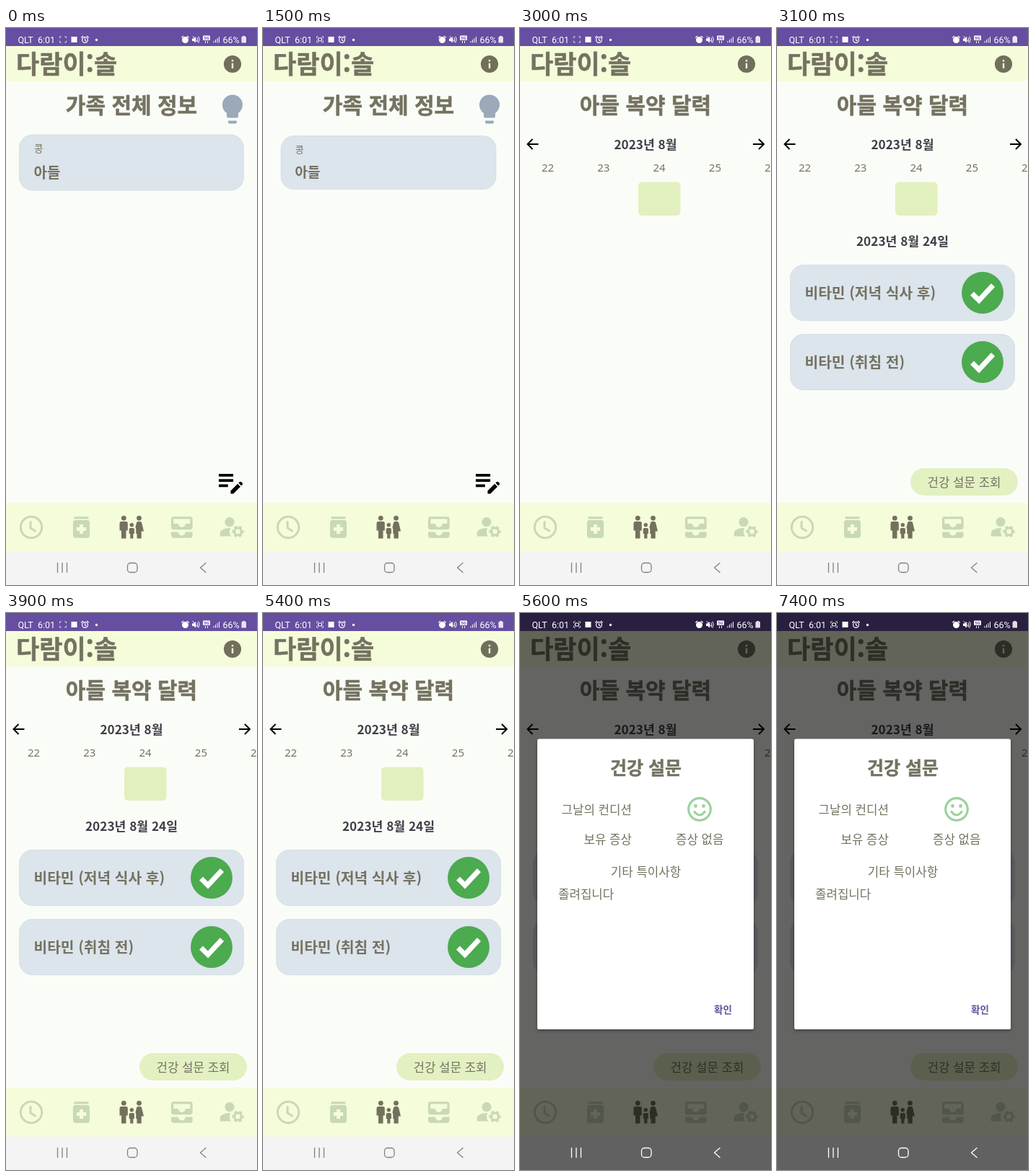
Write an HTML page that moves like this. It is 348x772 px and loops after 7.6 s.

```html
<!DOCTYPE html>
<html lang="ko">
<head>
<meta charset="utf-8">
<style>
  html, body { margin: 0; height: 100%; overflow: hidden; background: #fafdf7; }
  svg { display: block; width: 100%; height: 100%; }
  text { font: 400 16.8px "Noto Sans CJK KR", "Noto Sans CJK", sans-serif; fill: #747260; }
  .b { font-weight: 700; }
  .h { font-weight: 700; font-size: 30px; stroke: #747260; stroke-width: .5; stroke-linejoin: round; }
  .med { font-weight: 700; font-size: 20.3px; }
  .day { font: 15px "Noto Sans", sans-serif; }
  .month { font-weight: 700; font-size: 17.2px; fill: #403e48; }
  .sys { font: 12.5px Roboto, sans-serif; fill: #fff; }
  .mid { text-anchor: middle; }
  .card { fill: #dce4ec; stroke: #d3dbe2; stroke-width: .8; }
  .line { fill: none; stroke-linecap: round; stroke-linejoin: round; }
</style>
</head>
<body>
<svg viewBox="0 0 348 772" preserveAspectRatio="none">
  <defs>
    <g id="alarm" stroke="#fff" stroke-width="1.2" stroke-linecap="round">
      <circle r="3.9" cy=".5"/><path fill="none" d="M0-1.5V.8L1.6 1.8M-4.8-3 -2.8-4.7M4.8-3 2.8-4.7"/>
    </g>
    <g id="check">
      <circle r="29" fill="#4caa4f"/>
      <path d="M-14.500 1 -5 10.500 14.500-10.500" fill="none" stroke="#fff" stroke-width="7"/>
    </g>
    <path id="arrow" d="M25.500 161H11M17.500 154 10.500 161 17.500 168" fill="none" stroke="#000" stroke-width="2"/>
    <filter id="shade" x="-10%" y="-10%" width="120%" height="120%">
      <feDropShadow dx="0" dy="2" stdDeviation="2.5" flood-opacity=".35"/>
    </filter>
  </defs>

  <rect width="348" height="772" fill="#fafdf7"/>
  <rect width="348" height="25" fill="#664ea0"/>
  <rect y="25" width="348" height="49" fill="#f5fcda"/>
  <text class="h" x="14" y="63" style="font-size:35px">다람이:솔</text>
  <path transform="translate(299.500 35.500) scale(1.210)" fill="#716f5c" d="M12 2a10 10 0 1 0 0 20a10 10 0 1 0 0-20zm1 15h-2v-6h2v6zm0-8h-2V7h2v2z"/>

  <g id="family">
    <text class="h mid" x="174" y="118">가족 전체 정보</text>
    <path transform="translate(290 88.500) scale(2)" fill="#9ba9b9" d="M12 2A7 7 0 0 0 5 9C5 11.380 6.190 13.470 8 14.740V17A1 1 0 0 0 9 18H15A1 1 0 0 0 16 17V14.740C17.810 13.470 19 11.380 19 9A7 7 0 0 0 12 2M9 21A1 1 0 0 0 10 22H14A1 1 0 0 0 15 21V20H9Z"/>
    <g id="member">
      <rect class="card" x="18.500" y="148" width="311" height="77" rx="18"/>
      <text x="39" y="172" style="font-size:13.500px">콩</text>
      <text class="b" x="38.500" y="207.500" style="font-size:20px">아들</text>
    </g>
    <path transform="translate(289.500 607) scale(1.830)" d="M3 10h11v2H3zM3 8h11V6H3zM3 16h7v-2H3zM18 12.870l.7-.7c.4-.4 1-.4 1.400 0l.7.7c.4.4.4 1 0 1.400l-.7.7zM17.300 13.580l-5.300 5.300V21h2.120l5.300-5.300z"/>
  </g>

  <g id="calendar">
    <text class="h mid" x="174" y="118">아들 복약 달력</text>
    <text class="month mid" x="174" y="167.500">2023년 8월</text>
    <use href="#arrow"/>
    <use href="#arrow" transform="translate(348.500) scale(-1 1)"/>
    <g id="days">
      <rect x="164" y="213.500" width="58.500" height="46.500" rx="5" fill="#e2f0c0"/>
    </g>
    <g id="detail">
      <text class="month mid" x="174" y="301.500">2023년 8월 24일</text>
      <rect class="card" x="18.500" y="328.500" width="311" height="77" rx="18"/>
      <rect class="card" x="18.500" y="424.500" width="311" height="77" rx="18"/>
      <text class="med" x="38.500" y="374.500">비타민 (저녁 식사 후)</text>
      <text class="med" x="38.500" y="470.500">비타민 (취침 전)</text>
      <use href="#check" x="285" y="367"/>
      <use href="#check" x="285" y="463"/>
      <rect x="185" y="610" width="149" height="38" rx="19" fill="#e3f0c2"/>
      <text class="mid" x="259.500" y="635.500">건강 설문 조회</text>
    </g>
  </g>

  <rect y="658" width="348" height="68" fill="#f5fcda"/>
  <g fill="#c9d9b5">
    <g class="line" stroke="#c9d9b5" stroke-width="3"><circle cx="35" cy="692" r="14.700"/><path d="M34 684.500V693L40.500 697"/></g>
    <path transform="translate(84.700 672.200) scale(1.650)" d="M6 3h12v2H6zM17 6H7c-1.100 0-2 .9-2 2v11c0 1.100.9 2 2 2h10c1.100 0 2-.9 2-2V8c0-1.100-.9-2-2-2zm-1 9h-2.500v2.500h-3V15H8v-3h2.500V9.500h3V12H16z"/>
    <path transform="translate(224 672.200) scale(1.650)" d="M19 3H5c-1.100 0-2 .9-2 2v7c0 1.100.9 2 2 2h14c1.100 0 2-.9 2-2V5c0-1.100-.9-2-2-2zm0 6h-4c0 1.620-1.380 3-3 3s-3-1.380-3-3H5V5h14zM15 16h6v3c0 1.100-.9 2-2 2H5c-1.100 0-2-.9-2-2v-3h6c0 1.660 1.340 3 3 3s3-1.340 3-3z"/>
    <g transform="translate(293.500 671.500) scale(1.650)">
      <circle cx="10" cy="8" r="4"/>
      <path d="M10.670 13C7.500 12.900 5.300 13.700 3.400 14.800 2.500 15.300 2 16.300 2 17.350V20h9.260C9.800 17.900 9.600 15.300 10.670 13z"/>
      <g fill="none" stroke="#c9d9b5">
        <circle cx="17" cy="16" r="3" stroke-width="2"/>
        <circle cx="17" cy="16" r="4.300" stroke-width="1.400" stroke-dasharray="2.252" stroke-dashoffset="1.126"/>
      </g>
    </g>
  </g>
  <g fill="#73715d">
    <circle cx="163.300" cy="679.300" r="3.400"/><circle cx="184.500" cy="679.300" r="3.400"/><circle cx="174.300" cy="688.700" r="2.700"/>
    <path d="M160 684h6.500q2.300 0 2.300 2.300V696.500h-2.300v11h-6.500v-11h-2.500V686.300q0-2.300 2.500-2.300z"/>
    <path d="M183 684h3q1.700 0 2.200 1.700L191 697.500h-3.300v10h-6.200V701h-1.200v-6l-.8-3 1.500-6.300q.4-1.700 2-1.700z"/>
    <path d="M172.500 693h3.600q1.800 0 1.800 1.800v6.200h-1.500v6.500h-4.200v-6.500h-1.500v-6.200q0-1.800 1.800-1.800z"/>
  </g>
  <rect y="725.500" width="348" height="46.500" fill="#f4f4f4"/>

  <rect id="dim" width="348" height="772"/>
  <g id="nav" class="line" stroke-width="1.300">
    <path d="M71.500 741.500v13M78 741.500v13M84.500 741.500v13M277 741.500 269.500 748 277 754.500"/>
    <rect x="168.500" y="741.500" width="13.500" height="13" rx="4"/>
  </g>

  <g fill="#fff">
    <text class="sys" x="16.500" y="20.500">QLT</text>
    <text class="sys" x="44" y="20.500">6:01</text>
    <path class="line" stroke="#fff" opacity=".75" d="M74.500 14V12H76.500M81.500 12H83.500V14M83.500 18V20H81.500M76.500 20H74.500V18"/>
    <rect id="rec" x="76.500" y="14" width="5" height="4" rx="1" fill="none" stroke="#fff" stroke-width="1.200"/>
    <rect x="90.500" y="12" width="8" height="8"/>
    <use href="#alarm" x="109.500" y="16" fill="none"/>
    <circle cx="125.500" cy="16.500" r="1.700"/>
    <use href="#alarm" x="248.500" y="16"/>
    <path d="M258 14.500h2l3-2.500v8.500l-3-2.500h-2z"/>
    <path class="line" stroke="#fff" d="M259 11.500 267 20.500M265 13.500q2 2.500 0 5M267 12q2.500 3 .5 7"/>
    <rect x="273" y="10.500" width="10" height="6.500" rx="1"/>
    <text x="278" y="16" class="sys mid" style="font-size:6px;font-weight:700;fill:#664ea0">5G</text>
    <path class="line" stroke="#fff" d="M276.500 18.500v2M279.500 18.500v2M288 18.500v1.500M290.500 16.500V20M293 14.500V20M295.500 12.500V20"/>
    <text class="sys" x="300.500" y="20.500">66%</text>
    <path d="M328 11h3.500v1.200H333V20.500H326.500V12.200H328z" opacity=".85"/>
  </g>

  <g id="dialog">
    <rect x="24" y="174.500" width="300" height="402.500" rx="2.500" fill="#fff" filter="url(#shade)"/>
    <text class="h mid" x="174.500" y="223.500" style="font-size:25px">건강 설문</text>
    <text x="57.500" y="278.500">그날의 컨디션</text>
    <g class="line" stroke="#9bd29e" stroke-width="3.200">
      <circle cx="249" cy="272" r="15.300"/>
      <path d="M242 275.500q7 9 14 0"/>
      <path d="M243.500 267.500h.01M254.500 267.500h.01" stroke-width="4.800"/>
    </g>
    <text x="88.500" y="319.500">보유 증상</text>
    <text x="216" y="319.500">증상 없음</text>
    <text class="mid" x="174.500" y="364.500">기타 특이사항</text>
    <text x="53" y="395.500">졸려집니다</text>
    <text class="b" x="269" y="555" style="font-size:13.500px;fill:#62529c">확인</text>
  </g>
</svg>
<script>
  const LOOP = 7600, STEP = 100;
  const $ = id => document.getElementById(id);
  const clamp = v => Math.min(1, Math.max(0, v));
  const show = (id, on) => $(id).style.display = on ? '' : 'none';

  for (let i = 0; i < 5; i++) {
    const day = document.createElementNS('http://www.w3.org/2000/svg', 'text');
    day.setAttribute('class', 'day mid');
    day.setAttribute('x', 38.5 + i * 77.3);
    day.setAttribute('y', 199);
    day.textContent = 22 + i;
    $('days').append(day);
  }

  function draw() {
    // the screen refreshes ten times a second
    const t = Math.floor(performance.now() % LOOP / STEP) * STEP;

    show('rec', Math.floor((t + 100) / 500) % 2);
    show('family', t < 1600);
    show('calendar', t >= 1600);
    show('days', t >= 2100);
    show('detail', t >= 3100);

    const press = 1 - .042 * clamp((t - 1350) / 150);
    $('member').setAttribute('transform', `translate(174 186.5) scale(${press}) translate(-174 -186.5)`);

    const open = clamp((t - 5400) / 175);
    $('dim').style.opacity = .6 * open;
    $('dialog').style.opacity = 1 - (1 - open) ** 2;
    const grey = 130 + 125 * open;
    $('nav').style.stroke = `rgb(${grey}, ${grey}, ${grey})`;

    requestAnimationFrame(draw);
  }
  draw();
</script>
</body>
</html>
```
